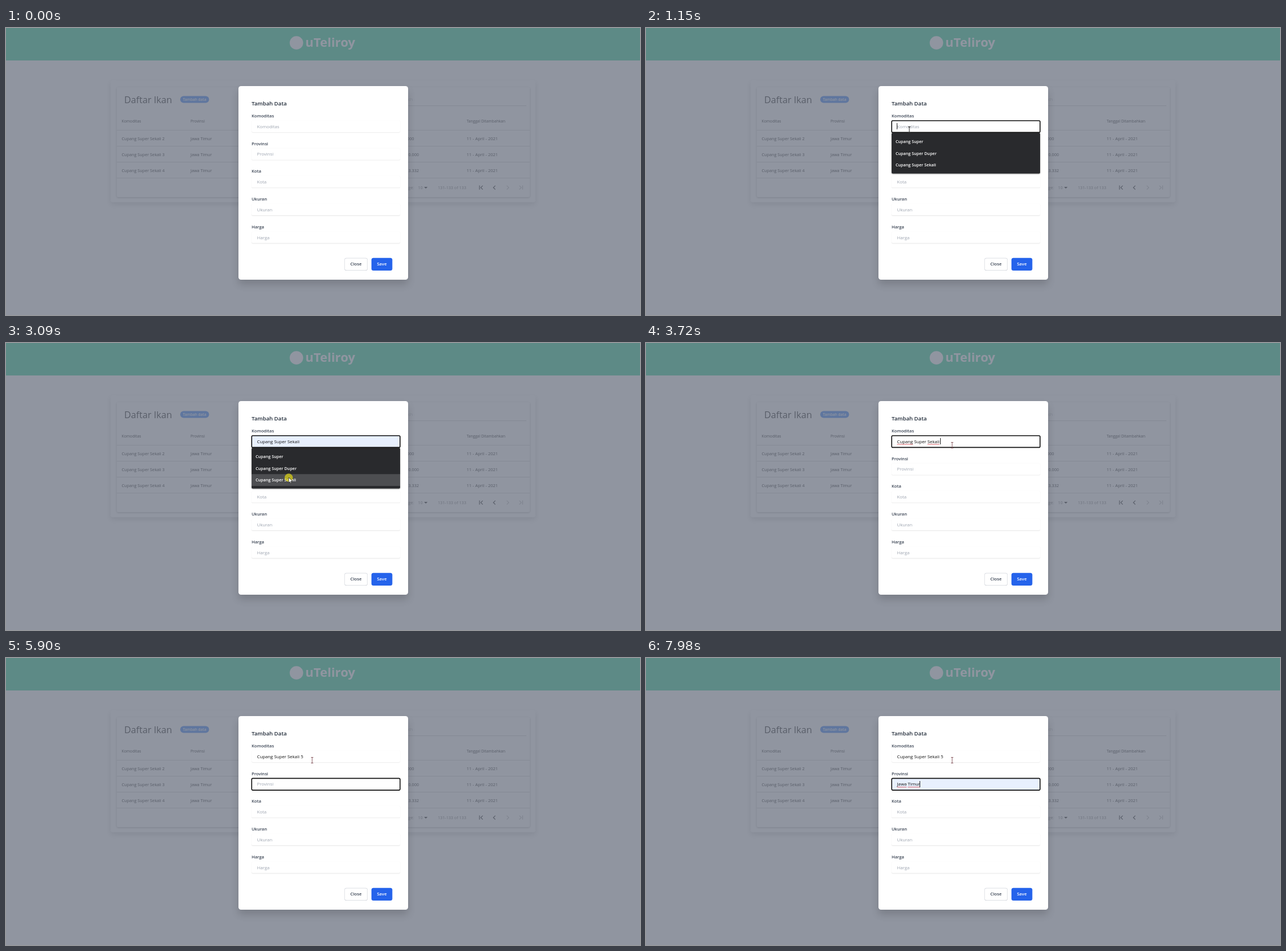
Recreate the animation shown at these times as an HTML page with a canvas. Size 1110x504 px, loop 8000 ms.

```html
<!DOCTYPE html>
<html lang="id">
<head>
<meta charset="utf-8">
<style>
  html, body { margin: 0; width: 100%; height: 100%; overflow: hidden; }
  canvas { display: block; }
</style>
</head>
<body>
<canvas id="stage" width="1110" height="504"></canvas>
<script>
const ctx = document.getElementById('stage').getContext('2d');
const LOOP = 8000, STEP = 77.7, PITCH = 48.7, ITEM = 20.8;
const FIELDS = ['Komoditas', 'Provinsi', 'Kota', 'Ukuran', 'Harga'];
const FISH = ['Cupang Super', 'Cupang Super Duper', 'Cupang Super Sekali'];

// Each entry changes part of the form state; caret is the text left of it.
const EVENTS = [
  [0, { focus: -1, values: ['', ''], menu: [], pick: -1, caret: null, spell: false, click: false }],
  [1070, { focus: 0, menu: FISH, caret: '', click: true }],
  [1150, { click: false }],
  [1610, { caret: null }],
  [2140, { caret: '' }],
  [2680, { caret: null }],
  [3090, { click: true }],
  [3170, { click: false, menu: [], filled: true, values: [FISH[2], ''], caret: FISH[2] }],
  [3720, { filled: false, spell: true, caret: FISH[2] + ' ' }],
  [4270, { caret: null }],
  [4580, { values: [FISH[2] + ' 5', ''], caret: FISH[2] + ' 5' }],
  [5120, { caret: null }],
  [5360, { focus: 1, spell: false, caret: '' }],
  [5900, { caret: null }],
  [6440, { caret: '' }],
  [6820, { values: [FISH[2] + ' 5', 'J'], menu: ['Jawa Timur'], caret: 'J' }],
  [6980, { values: [FISH[2] + ' 5', 'Ja'], caret: 'Ja' }],
  [7140, { values: [FISH[2] + ' 5', 'Jawa'], caret: 'Jawa' }],
  [7440, { pick: 0 }],
  [7900, { menu: [], pick: -1, filled: true, values: [FISH[2] + ' 5', 'Jawa Timur'], caret: 'Jawa Timur' }],
  [7980, { spell: true }]
];

// Pointer path: time, x, y
const PATH = [
  [210, 879, 420], [450, 790, 362], [680, 600, 254], [990, 461, 178], [1992, 461, 178],
  [2310, 482, 197], [2860, 495, 236], [3170, 495, 236], [3330, 536, 179]
];

function text(str, x, mid, size, color, weight = 400, align = 'left') {
  ctx.font = `${weight} ${size}px "Open Sans", "Noto Sans", sans-serif`;
  ctx.fillStyle = color;
  ctx.textAlign = align;
  ctx.fillText(str, x, mid + size * 0.35);
}

function box(x, y, w, h, r, fill, shadow) {
  ctx.save();
  if (shadow) {
    [ctx.shadowOffsetY, ctx.shadowBlur] = shadow;
    ctx.shadowColor = `rgba(0,0,0,${shadow[2]})`;
  }
  ctx.beginPath();
  ctx.roundRect(x, y, w, h, r);
  ctx.fillStyle = fill;
  ctx.fill();
  ctx.restore();
}

function line(points, color, width = 1) {
  ctx.beginPath();
  points.forEach(([x, y]) => ctx.lineTo(x, y));
  ctx.strokeStyle = color;
  ctx.lineWidth = width;
  ctx.stroke();
}

function shape(points, fill, stroke) {
  ctx.beginPath();
  points.forEach(([x, y]) => ctx.lineTo(x, y));
  ctx.closePath();
  ctx.fillStyle = fill;
  ctx.fill();
  if (stroke) {
    ctx.strokeStyle = stroke;
    ctx.lineWidth = 0.7;
    ctx.stroke();
  }
}

function disc(x, y, r, fill) {
  ctx.beginPath();
  ctx.arc(x, y, r, 0, 7);
  ctx.fillStyle = fill;
  ctx.fill();
}

function chevron(x, dir, color, bar) {
  line([[x + 1.7 * dir, 276.8], [x - 1.7 * dir, 280.2], [x + 1.7 * dir, 283.6]], color, 1.2);
  if (bar) line([[x - 4 * dir, 276.6], [x - 4 * dir, 283.8]], color, 1.2);
}

function drawPage() {
  const ink = 'rgba(0,0,0,.87)', soft = 'rgba(0,0,0,.54)', pale = 'rgba(0,0,0,.26)';
  box(0, 0, 1110, 504, 0, '#fff');
  box(0, 0, 1110, 57, 0, '#34d399');
  disc(508.5, 26, 11.8, '#fff');
  text('uTeliroy', 524, 25, 22, '#fff', 700);

  box(183, 92, 744, 214, 4, '#fff', [4, 9, 0.16]);
  box(194, 104, 723, 193, 2, '#fff', [1, 3, 0.3]);
  text('Daftar Ikan', 207, 126.3, 16.2, ink);
  box(305, 119.5, 50.5, 12, 6, '#3b82f6');
  text('Tambah data', 330.2, 125.5, 6.5, '#fff', 600, 'center');
  text('Search', 712.5, 125.7, 7.6, pale, 400, 'right');
  line([[690, 136.5], [911, 136.5]], pale, 0.7);

  text('Komoditas', 202.5, 164, 6.8, ink, 500);
  text('Provinsi', 323, 164, 6.8, ink, 500);
  text('Tanggal Ditambahkan', 806.5, 164, 6.7, ink, 500);
  line([[194, 179.5], [917, 179.5]], '#d4d4d4');
  ['Rp 5.000', 'Rp 50.000', 'Rp 33.332'].forEach((price, i) => {
    const y = 194 + 28.1 * i;
    text(FISH[2] + ' ' + (i + 2), 202.5, y, 7.25, ink);
    text('Jawa Timur', 323, y, 7.25, ink);
    text(price, i ? 723 : 714.5, y, 7.25, ink, 400, 'right');
    text('11 - April - 2021', 806.5, y, 7.5, ink);
    line([[194, 207.5 + 28 * i], [917, 207.5 + 28 * i]], '#d4d4d4');
  });

  text('Rows per page:', 714, 280.5, 7.1, soft, 400, 'right');
  text('10', 721.5, 280.5, 7.2, soft);
  shape([[732, 279], [738, 279], [735, 282]], ink);
  text('131-133 of 133', 756, 280.5, 7.2, soft);
  chevron(833, 1, ink, true);
  chevron(855, 1, ink);
  chevron(878.5, -1, pale);
  chevron(900.5, -1, pale, true);
  box(0, 0, 1110, 504, 0, 'rgba(107,114,128,.75)');
}

function drawField(i, s, hover) {
  const y = PITCH * i, focused = s.focus === i;
  const preview = focused && hover >= 0;
  const value = preview ? s.menu[hover] : s.values[i] || '';
  text(FIELDS[i], 430, 154.3 + y, 7.55, '#374151', 600);

  if (focused) {
    const tinted = preview || s.filled;
    ctx.beginPath();
    ctx.roundRect(430.2, 162.7 + y, 259.7, 20.7, 2);
    ctx.fillStyle = tinted ? '#e8f0fe' : '#fff';
    ctx.fill();
    ctx.strokeStyle = '#101010';
    ctx.lineWidth = 1.6;
    ctx.stroke();
  } else {
    box(430, 162.5 + y, 260, 20.5, 2, '#fff', [0.6, 1.2, 0.13]);
  }

  text(value || FIELDS[i], 439.5, 173 + y, 7.8, value ? '#111' : '#9ca3af');
  if (!focused) return;
  const width = str => ctx.measureText(str).width;
  if (s.spell) {
    const words = value.split(' ').filter(w => w !== 'Super' && w !== '5');
    words.forEach(w => {
      const x = 439.5 + width(value.slice(0, value.indexOf(w)));
      line([[x, 178 + y], [x + width(w), 178 + y]], '#d9555c', 0.9);
    });
  }
  if (s.caret !== null) {
    box(Math.floor(439.4 + width(s.caret)), Math.round(167 + y), 1, 11, 0, '#222');
  }
}

function drawModal(s, hover) {
  box(407, 102, 297, 340, 4.6, '#fff', [8, 14, 0.16]);
  text('Tambah Data', 430, 132.7, 9.6, '#1f2937', 600);
  FIELDS.forEach((_, i) => drawField(i, s, hover));

  box(592.5, 403.8, 40.6, 22.2, 3.6, '#d1d5db');
  box(593.2, 404.5, 39.2, 20.8, 3, '#fff');
  text('Close', 612.8, 414.8, 7.7, '#374151', 600, 'center');
  box(639.8, 403.8, 36.6, 22.2, 3.5, '#2563eb');
  text('Save', 658, 414.8, 7.7, '#fff', 600, 'center');

  if (!s.menu.length) return;
  const top = 184 + PITCH * s.focus;
  box(430, top, 260, ITEM * s.menu.length + 9, 2, '#292a2d', [0.8, 2, 0.5]);
  s.menu.forEach((item, i) => {
    const y = top + 4.7 + ITEM * i;
    if (i === hover) box(430, y, 260, ITEM, 0, '#4d4e51');
    text(item, 437, y + 10.5, 7.2, '#fff', 600);
  });
}

function pointerAt(t) {
  const time = 210 + STEP * Math.floor((t - 210) / STEP + 0.1);
  const next = PATH.findIndex(p => p[0] > time);
  if (next < 0) return PATH[PATH.length - 1].slice(1);
  if (next === 0) return PATH[0].slice(1);
  const [a, b] = [PATH[next - 1], PATH[next]];
  const k = (time - a[0]) / (b[0] - a[0]);
  return [1, 2].map(n => Math.round(a[n] + (b[n] - a[n]) * k));
}

function drawPointer(x, y, s, t) {
  if (s.click) disc(x, y + 0.5, 7.2, 'rgba(225,215,20,.7)');
  const row = (y - 162) / PITCH;
  const overField = x > 430 && x < 690 && row < 5 && row % 1 < 0.45;
  if (overField && !(s.menu.length && y > 184)) {
    const color = t < 3480 ? '#222' : '#8c5f66';
    line([[x, y - 5], [x, y + 6]], color);
    [-4.5, 5.5].forEach(d => line([[x - 2, y + d], [x + 2, y + d]], color));
  } else {
    const outline = [[0, 0], [0, 9.5], [2.1, 7.6], [3.5, 10.8], [4.9, 10.2], [3.6, 7], [6.5, 6.8]];
    shape(outline.map(([dx, dy]) => [x + dx, y + dy]), '#fff', '#111');
  }
}

function draw(now) {
  const t = now % LOOP;
  const s = { filled: false };
  EVENTS.forEach(([time, change]) => time <= t && Object.assign(s, change));
  // A fresh field starts without the autofill tint.
  const [x, y] = pointerAt(t);
  const under = Math.floor((y - 188.7) / ITEM);
  const hover = s.focus === 0 && under >= 0 && under < s.menu.length ? under : s.pick;
  drawPage();
  drawModal(s, hover);
  if (t >= 210) drawPointer(x, y, s, t);
  requestAnimationFrame(draw);
}
requestAnimationFrame(draw);
</script>
</body>
</html>
```
